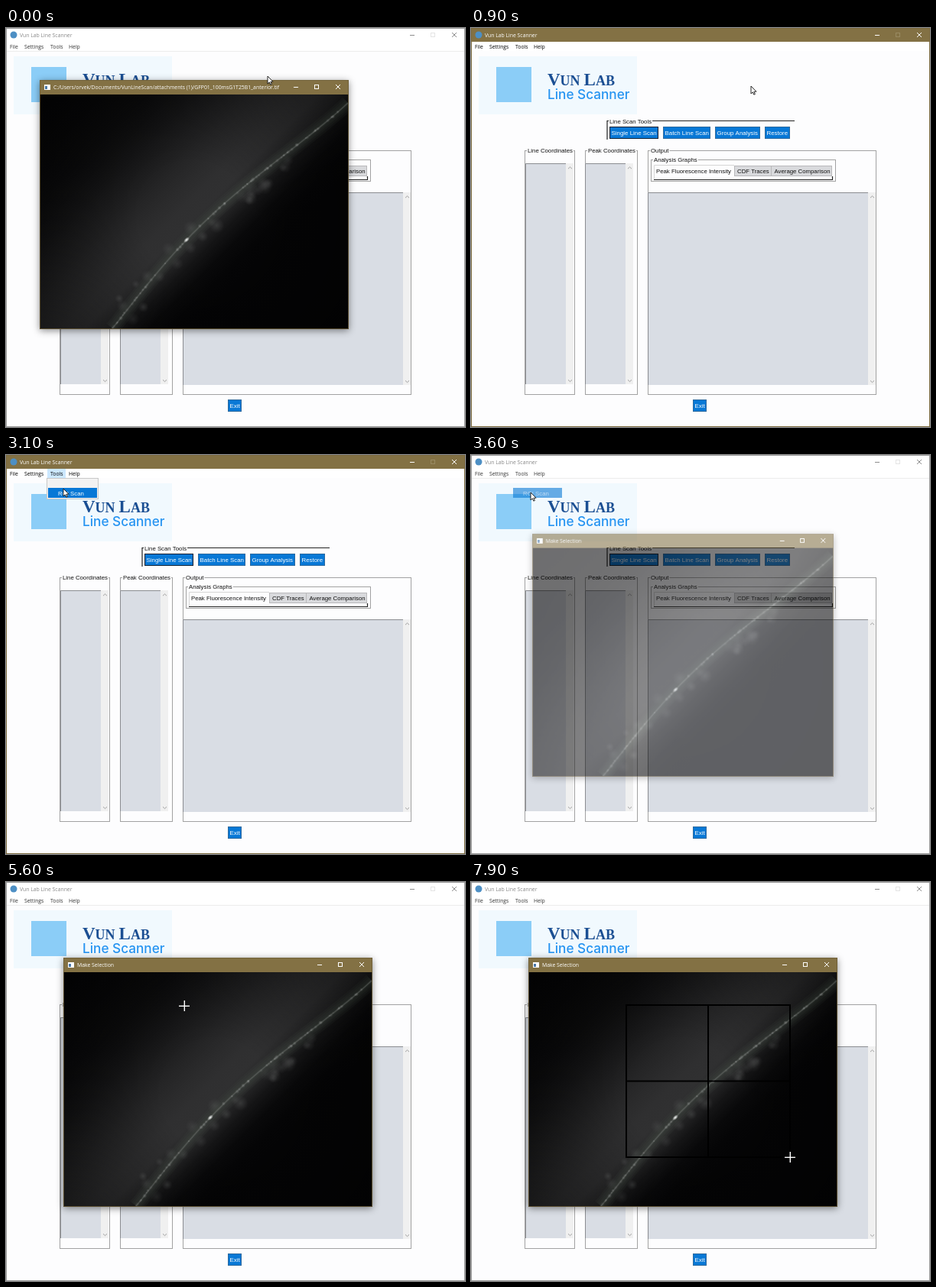
An HTML page with a canvas for the animation above (8000 ms loop, 600x522 px).

```html
<!DOCTYPE html>
<html lang="en">
<head>
<meta charset="utf-8">
<title>Line scan demo</title>
<style>
html, body { margin: 0; width: 100%; height: 100%; overflow: hidden; background: #fff; }
canvas { display: block; width: 600px; height: 522px; }
</style>
</head>
<body>
<canvas id="stage" width="600" height="522"></canvas>
<script>
const LOOP = 8000, STEP = 100;
const BROWN = '#837144', BLUE = '#0878d6', PANEL = '#d9dde4', PAGE = '#fdfdfe';
const WIN_W = 404, WIN_H = 326, BAR = 19, MARGIN = 16;
const UI = '"Open Sans", "Noto Sans", sans-serif';
const ARIAL = '"Liberation Sans", Arial, sans-serif';
const APP = 'Vun Lab Line Scanner';
const FILE = 'C:/Users/orvek/Documents/VunLineScan/attachments (1)/GFP01_100msG1T25B1_anterior.tif';
let ctx = document.getElementById('stage').getContext('2d');

// Pointer stops: time, x, y
const DRAG = { start: 5800, end: 7700, from: [202, 160], to: [417, 360] };
const STOPS = [
  [0, 342, 63], [900, 366, 76], [2100, 53, 25], [2700, 63, 26], [3200, 78, 49], [3800, 78, 49],
  [4500, 134, 107], [5200, 276, 174], [5600, 233, 162], [5700, ...DRAG.from], [DRAG.start, ...DRAG.from]
];
const mix = (a, b, k) => Math.round(a + (b - a) * k);

function pointerAt(t) {
  if (t > DRAG.start) {
    const k = Math.min(1, (t - DRAG.start) / (DRAG.end - DRAG.start));
    const eased = 1 - Math.pow(1 - k, 2.6);
    return DRAG.from.map((v, i) => mix(v, DRAG.to[i], eased));
  }
  const i = Math.max(1, STOPS.findIndex(p => p[0] >= t));
  const [t0, x0, y0] = STOPS[i - 1], [t1, x1, y1] = STOPS[i];
  const k = (t - t0) / (t1 - t0);
  return [mix(x0, x1, k), mix(y0, y1, k)];
}

function box(x, y, w, h, fill) {
  ctx.fillStyle = fill;
  ctx.fillRect(x, y, w, h);
}

function outline(x, y, w, h, color, width = 1) {
  ctx.strokeStyle = color;
  ctx.lineWidth = width;
  ctx.strokeRect(x, y, w, h);
}

function line(color, width, ...pts) {
  ctx.strokeStyle = color;
  ctx.lineWidth = width;
  ctx.beginPath();
  for (let i = 0; i < pts.length; i += 2) ctx.lineTo(pts[i], pts[i + 1]);
  ctx.stroke();
}

// Draws text and returns its width
function text(str, x, y, color = '#111', font = '7.8px ' + ARIAL) {
  ctx.font = font;
  ctx.fillStyle = color;
  ctx.fillText(str, x, y);
  return ctx.measureText(str).width;
}

const uiText = (str, x, y, color) => text(str, x, y, color, '6.85px ' + UI);

// Runs a painter on a new canvas and returns that canvas
function offscreen(w, h, paint) {
  const canvas = document.createElement('canvas');
  canvas.width = w;
  canvas.height = h;
  const outer = ctx;
  ctx = canvas.getContext('2d');
  paint();
  ctx = outer;
  return canvas;
}

function seeded(seed) {
  return () => (seed = (seed * 16807) % 2147483647) / 2147483647;
}

function glow(x, y, r, level, alpha) {
  const g = ctx.createRadialGradient(x, y, 0, x, y, r);
  g.addColorStop(0, `rgba(${level},${level + 4},${level + 2},${alpha})`);
  g.addColorStop(1, `rgba(${level},${level},${level},0)`);
  box(x - r, y - r, 2 * r, 2 * r, g);
}

const fibre = s => [95 + 308 * s, 306 - 295 * s - 24 * Math.pow(Math.sin(Math.PI * Math.pow(s, .75)), 1.5)];

function strokeFibre(width, alpha) {
  const pts = [];
  for (let s = 0; s < .999; s += .02) pts.push(...fibre(s));
  line(`rgba(150,154,152,${alpha})`, width, ...pts, 403, 11);
}

// Soft stand-in for the microscope view: a glowing fibre across a dark field
function paintScan() {
  const field = ctx.createLinearGradient(0, 0, 350, 350);
  for (let p = 0; p <= 1; p += .04) {
    const spread = p < .52 ? .24 : .08;
    const v = 4 + 44 * Math.exp(-Math.pow((p - .52) / spread, 2));
    field.addColorStop(p, `rgb(${v},${v},${v + 1})`);
  }
  box(0, 0, WIN_W, WIN_H, field);
  const edge = ctx.createRadialGradient(200, 160, 70, 200, 160, 290);
  edge.addColorStop(0, 'rgba(0,0,0,0)');
  edge.addColorStop(1, 'rgba(0,0,0,.55)');
  box(0, 0, WIN_W, WIN_H, edge);

  for (let w = 20; w > 3; w -= 5) strokeFibre(w, .035);
  strokeFibre(1.8, .27);

  const rnd = seeded(77);
  for (let i = 0; i < 70; i++) {
    const [x, y] = fibre(rnd());
    glow(x + rnd() - .5, y + rnd() - .5, 1.5 + rnd() * 1.5, 165, .12 + rnd() * .3);
  }
  // Loose blobs hang below the fibre, and on both sides near its lower end
  for (let i = 0; i < 26; i++) {
    const s = .05 + rnd() * .68;
    const side = s < .35 && i % 2 ? -1 : 1;
    const off = side * (4 + rnd() * 9);
    const [x, y] = fibre(s);
    glow(x + off, y + off, 5 + rnd() * 5, 120, .1 + rnd() * .16);
  }
  const [x, y] = fibre(.315);
  ctx.translate(x, y);
  ctx.rotate(-.75);
  ctx.scale(1.8, 1);
  glow(0, 0, 2.6, 245, 1);
}
const scan = offscreen(WIN_W, WIN_H - BAR, paintScan);

function controls(right, y, color, maxColor) {
  line(color, 1, right - 72, y + .5, right - 66, y + .5);
  outline(right - 44.5, y - 2.5, 5, 5, maxColor);
  line(color, 1, right - 17, y - 3, right - 11, y + 3);
  line(color, 1, right - 11, y - 3, right - 17, y + 3);
}

function chevron(x, y, dir) {
  line('#a0a0a0', 1, x - 2.5, y + dir * 1.2, x, y - dir * 1.2, x + 2.5, y + dir * 1.2);
}

function list(x, y, w, bottom) {
  box(x, y, w, bottom - y, PANEL);
  line('#8b8d91', 1, x + .5, bottom, x + .5, y + .5, x + w, y + .5);
  box(x + w, y, 10, bottom - y, '#f0f0f0');
  chevron(x + w + 5.5, y + 6, 1);
  chevron(x + w + 5.5, bottom - 4.5, -1);
}

function legend(label, x, y) {
  ctx.font = '7.8px ' + ARIAL;
  box(x - 1, y - 4, ctx.measureText(label).width + 2, 8, PAGE);
  text(label, x, y + 3);
}

function group(label, x, y, w, h) {
  outline(x + .5, y + .5, w, h, '#a2a2a2');
  legend(label, x + 4, y);
}

// Returns the x where the next button starts
function button(label, x, y, focused) {
  const font = '7.9px ' + ARIAL;
  ctx.font = font;
  const w = Math.round(ctx.measureText(label).width) + 5;
  box(x, y, w, 16, BLUE);
  outline(x + .5, y + .5, w - 1, 15, focused ? '#102030' : '#2d6a9e');
  text(label, x + 2.5, y + 10.6, '#fff', font);
  return x + w + 5.5;
}

function logo() {
  box(10, 37, 207, 76, '#f1f9fe');
  box(33, 51, 46, 46, '#8bcdf7');
  let x = 100;
  for (const word of ['VUN', 'LAB']) {
    [...word].forEach((letter, i) => {
      x += text(letter, x, 75, '#1b4f93', `bold ${i ? 18 : 23}px "Liberation Serif", serif`);
    });
    x += 5;
  }
  text('Line Scanner', 100, 93.3, '#2694f1', '500 17.2px Inter, sans-serif');
}

function mainWindow(active) {
  box(0, 0, 600, 522, PAGE);
  box(0, 0, 600, 18, active ? BROWN : '#fff');
  box(0, 18, 600, 12, '#fff');
  ctx.fillStyle = '#4d8fc4';
  ctx.beginPath();
  ctx.arc(10, 9, 4.5, 0, 7);
  ctx.fill();
  uiText(APP, 18, 12, active ? '#fff' : '#888');
  controls(600, 9, active ? '#fff' : '#8c8c8c', active ? '#998a62' : '#e4e4e4');
  if (!active) line('#ececec', 1, 0, 30.5, 600, 30.5);
  logo();

  line('#222', 1.2, 178, 146, 178, 121.5, 423, 121.5);
  legend('Line Scan Tools', 181, 122);
  let x = 181;
  for (const label of ['Single Line Scan', 'Batch Line Scan', 'Group Analysis', 'Restore']) {
    x = Math.round(button(label, x, 129, x === 181));
  }
  button('Exit', 290, 486);

  group('Line Coordinates', 70, 160, 65, 319);
  list(71, 177, 53, 466);
  group('Peak Coordinates', 149, 160, 68, 319);
  list(149, 177, 53, 466);
  group('Output', 231, 160, 298, 319);
  list(231, 215, 288, 467);
  group('Analysis Graphs', 235, 172, 241, 28);

  box(345, 181, 127, 13, '#d9dadd');
  outline(344.5, 180.5, 48, 13, '#b9b9bb');
  outline(392.5, 180.5, 79, 13, '#b9b9bb');
  line('#d5d5d5', 1, 239.5, 198, 239.5, 179.5, 344, 179.5);
  line('#222', 1.2, 239, 198.5, 472.5, 198.5, 472.5, 194);
  text('Peak Fluorescence Intensity', 242, 190);
  text('CDF Traces', 348, 190);
  text('Average Comparison', 396.5, 190);
  outline(.5, .5, 599, 521, active ? '#7c6b40' : '#9a9a9a');
}

function menuItem(hot) {
  if (hot) box(55, 43, 64, 13, BLUE);
  text('ROI Scan', 68, 52.5, hot ? '#fff' : '#111');
}

function menuBar(t, x, y, active) {
  const open = t >= 2500 && t < 3500;
  const onSettings = x < 54;
  if (open) box(54, 18, 24, 12, '#cce8ff');
  else if (active && t >= 1900 && y < 31 && x < 78) {
    box(onSettings ? 19 : 54, 18, onSettings ? 33 : 24, 12, '#dcedfb');
  }
  const color = active ? '#000' : '#333';
  uiText('File', 5, 27, color);
  uiText('Settings', 24, 27, color);
  uiText('Tools', 58, 27, color);
  uiText('Help', 82, 27, color);

  if (open) {
    box(53, 30, 68, 28, '#f2f2f2');
    outline(53.5, 30.5, 67, 27, '#c8c8c8');
    menuItem(y >= 43);
  } else if (t >= 3500 && t < 3700) {
    ctx.globalAlpha = t < 3600 ? .85 : .6;
    menuItem(true);
    ctx.globalAlpha = 1;
  }
}

function paintWindow(title) {
  ctx.translate(MARGIN, MARGIN);
  ctx.shadowColor = 'rgba(0,0,0,.45)';
  ctx.shadowBlur = 9;
  ctx.shadowOffsetY = 2;
  box(0, 0, WIN_W, WIN_H, BROWN);
  ctx.shadowColor = 'transparent';
  ctx.drawImage(scan, 0, BAR);
  box(6, 6, 8, 7, '#fff');
  box(7, 8, 3, 4, '#4a78a8');
  uiText(title, 18, 12, '#fff');
  controls(WIN_W, 9, '#fff', '#fff');
  outline(.5, .5, WIN_W - 1, WIN_H - 1, 'rgba(110,94,56,.8)');
}
const makeWindow = title => offscreen(WIN_W + 2 * MARGIN, WIN_H + 2 * MARGIN, () => paintWindow(title));
const fileWindow = makeWindow(FILE);
const selectWindow = makeWindow('Make Selection');

function showWindow(picture, x, y, alpha = 1, scale = 1) {
  const { width: w, height: h } = picture;
  ctx.globalAlpha = alpha;
  ctx.drawImage(picture, x - MARGIN + w * (1 - scale) / 2, y - MARGIN + h * (1 - scale) / 2, w * scale, h * scale);
  ctx.globalAlpha = 1;
}

function selection(x, y) {
  const [x0, y0] = DRAG.from.map(v => v + 1);
  const w = x - x0, h = y - y0;
  outline(x0, y0, w, h, '#000', 2);
  line('#000', 2, x0 + w / 2, y0, x0 + w / 2, y0 + h);
  line('#000', 2, x0, y0 + h / 2, x0 + w, y0 + h / 2);
}

const arrowShape = new Path2D('M0 0V10L2.3 7.9 3.8 11.2 5.4 10.5 3.9 7.3 7 7.2Z');
function arrow(x, y) {
  ctx.save();
  ctx.translate(x, y);
  ctx.fillStyle = '#fff';
  ctx.fill(arrowShape);
  ctx.strokeStyle = '#111';
  ctx.lineWidth = .9;
  ctx.stroke(arrowShape);
  ctx.restore();
}

function cross(x, y) {
  line('#fff', 1.4, x - 7, y + .3, x + 7, y + .3);
  line('#fff', 1.4, x + .3, y - 7, x + .3, y + 7);
}

function draw(t) {
  const [x, y] = pointerAt(t);
  const active = t >= 400 && t < 3500;
  mainWindow(active);
  menuBar(t, x, y, active);
  if (t < 400) showWindow(fileWindow, 44, 68);
  else if (t < 500) showWindow(fileWindow, 44, 68, .5, .96);
  if (t >= 3700) showWindow(selectWindow, 75, 99);
  else if (t >= 3600) showWindow(selectWindow, 75, 99, .57, .975);
  if (t > DRAG.start) selection(x, y);
  if (t > 4400 && y >= 118) cross(x, y);
  else arrow(x, y);
}

function tick() {
  draw(Math.floor(performance.now() % LOOP / STEP) * STEP);
  requestAnimationFrame(tick);
}
tick();
</script>
</body>
</html>
```
